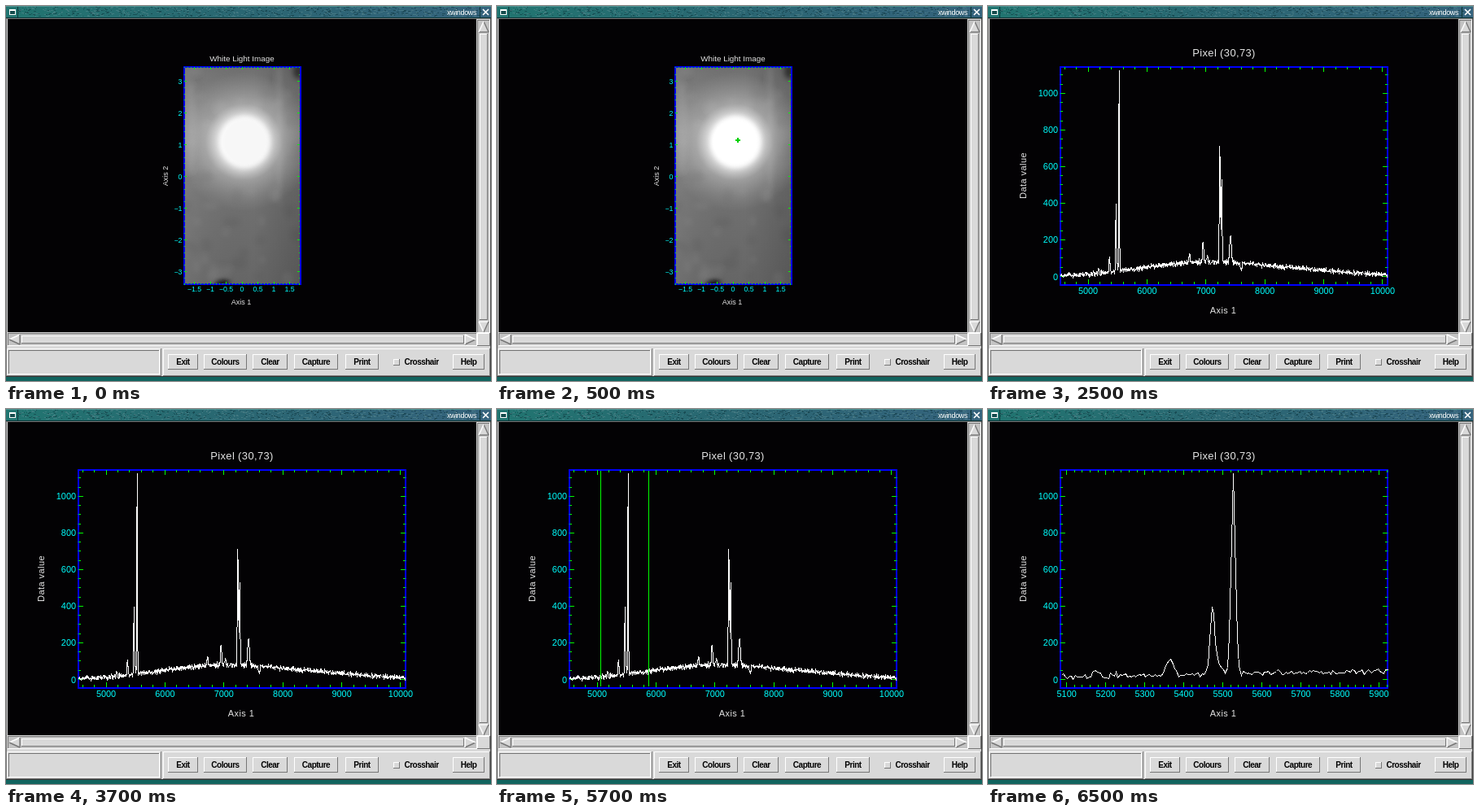
Write an HTML page that moves like this. It is 596 by 461 pixels and loops after 8000 ms.

```html
<!DOCTYPE html>
<html lang="en">
<head>
<meta charset="utf-8">
<title>Spectrum viewer</title>
<style>
html, body { margin: 0; width: 100%; height: 100%; overflow: hidden; background: #000; }
svg { display: block; width: 100%; height: 100%; font-family: "Liberation Sans", Arial, sans-serif; }
.ui { font-weight: bold; letter-spacing: -.5px; }
</style>
</head>
<body>
<svg id="stage" viewBox="0 0 596 461" preserveAspectRatio="none">
  <defs>
    <linearGradient id="bar">
      <stop offset="0" stop-color="#217570"/>
      <stop offset=".5" stop-color="#2a6672"/>
      <stop offset="1" stop-color="#35637d"/>
    </linearGradient>
    <linearGradient id="sky" x1="0" y1="0" x2="0" y2="1">
      <stop offset="0" stop-color="#707070"/>
      <stop offset=".3" stop-color="#898989"/>
      <stop offset=".58" stop-color="#717171"/>
      <stop offset="1" stop-color="#666"/>
    </linearGradient>
    <linearGradient id="side">
      <stop offset="0" stop-color="#fff" stop-opacity=".07"/>
      <stop offset=".6" stop-color="#000" stop-opacity="0"/>
      <stop offset="1" stop-color="#000" stop-opacity=".15"/>
    </linearGradient>
    <radialGradient id="glow">
      <stop offset=".3" stop-color="#fff"/>
      <stop offset=".4" stop-color="#eee" stop-opacity=".75"/>
      <stop offset=".55" stop-color="#ddd" stop-opacity=".38"/>
      <stop offset="1" stop-color="#bbb" stop-opacity="0"/>
    </radialGradient>
    <filter id="soft" x="-50%" y="-50%" width="200%" height="200%"><feGaussianBlur stdDeviation="3"/></filter>
    <clipPath id="frame"><rect x="219" y="75" width="142" height="267"/></clipPath>
  </defs>
  <g id="chrome"></g>
  <g id="image"></g>
  <g id="plot"></g>
  <g id="wide"></g>
  <g id="range"></g>
  <g id="zoom"></g>
</svg>
<script>
const LOOP = 8000;
const FACE = "#d9d9d9", LIGHT = "#fff", SHADE = "#777", TROUGH = "#c3c3c3";
const CYAN = "#0ff", GREEN = "#0f0", BLUE = "#00f", TEXT = "#e4e4e4";
const $ = id => document.getElementById(id);

function add(parent, tag, attrs, text) {
  const el = document.createElementNS("http://www.w3.org/2000/svg", tag);
  for (const k in attrs) el.setAttribute(k, attrs[k]);
  if (text !== undefined) el.textContent = text;
  parent.appendChild(el);
  return el;
}
const box = (g, x, y, width, height, fill) =>
  add(g, "rect", { x, y, width, height, fill, "shape-rendering": "crispEdges" });
const path = (g, d, stroke, width = 1, more = {}) =>
  add(g, "path", { d, stroke, "stroke-width": width, fill: "none", "shape-rendering": "crispEdges", ...more });
const label = (g, x, y, text, size, fill = TEXT, more = {}) =>
  add(g, "text", { x, y, fill, "font-size": size, "text-anchor": "middle", ...more }, text);
const sideLabel = (g, x, y, text, size, more) =>
  label(g, 0, 0, text, size, TEXT, { transform: `translate(${x} ${y}) rotate(-90)`, ...more });

function random(seed) {
  return () => (seed = (seed * 16807) % 2147483647) / 2147483647;
}

function bevel(g, x, y, w, h, sunken, fill = FACE) {
  box(g, x, y, w, h, sunken ? LIGHT : SHADE);
  box(g, x, y, w - 1, h - 1, sunken ? SHADE : LIGHT);
  box(g, x + 1, y + 1, w - 2, h - 2, fill);
}

// Triangle lit from the upper left
function arrow(g, cx, cy, turns) {
  const c = [1, 0, -1, 0][turns], s = [0, 1, 0, -1][turns];
  const pts = [[0, -7], [6, 6], [-6, 6]].map(([x, y]) => [x * c - y * s, x * s + y * c]);
  const at = ([x, y]) => `${cx + x} ${cy + y}`;
  add(g, "path", { d: `M${pts.map(at).join("L")}Z`, fill: FACE });
  pts.forEach((p, i) => {
    const q = pts[(i + 1) % 3];
    const lit = p[0] + q[0] + p[1] + q[1] < 0;
    path(g, `M${at(p)}L${at(q)}`, lit ? LIGHT : SHADE, 1.4, { "shape-rendering": "auto" });
  });
}

function drawTitleBar(g) {
  box(g, 0, 0, 596, 15, "url(#bar)");
  const rnd = random(71);
  for (const color of ["#0b3038", "#5a8a90"]) {
    let d = "";
    for (let i = 0; i < 450; i++) {
      d += `M${15 + Math.floor(rnd() * 568)} ${1.5 + Math.floor(rnd() * 12)}h${1 + Math.floor(rnd() * 3)}`;
    }
    path(g, d, color, 1, { opacity: .5 });
  }
  box(g, 0, 0, 596, 1, "#4f9492");
  box(g, 0, 14, 596, 1, "#0b3638");
  for (const x of [14, 582]) box(g, x, 1, 1, 13, "#0b3638");
  box(g, 4, 4, 8, 7, LIGHT);
  box(g, 5, 6, 6, 4, "#174d4e");
  path(g, "M586 4l7 7m0-7l-7 7", LIGHT, 1.6, { "shape-rendering": "auto" });
  label(g, 560, 11, "xwindows", 9, LIGHT, { "letter-spacing": "-.35px" });
}

function drawChrome() {
  const g = $("chrome");
  box(g, 0, 0, 596, 461, FACE);
  drawTitleBar(g);
  box(g, 0, 15, 596, 1, SHADE);
  box(g, 0, 15, 1, 440, SHADE);
  box(g, 2, 16, 576, 385, "#030204");

  bevel(g, 579, 17, 16, 385, true, TROUGH);
  arrow(g, 587, 26, 0);
  bevel(g, 582, 34, 10, 352, false);
  arrow(g, 587, 394, 2);

  bevel(g, 2, 402, 577, 16, true, TROUGH);
  arrow(g, 11, 410, 3);
  bevel(g, 19, 405, 544, 10, false);
  arrow(g, 570, 410, 1);
  bevel(g, 579, 402, 16, 16, false);

  bevel(g, 1, 421, 190, 34, false);
  bevel(g, 3, 423, 186, 30, true);
  bevel(g, 193, 421, 402, 34, false);

  const buttons = { Exit: [199, 37], Colours: [243, 53], Clear: [303, 43],
    Capture: [354, 54], Print: [417, 41], Help: [549, 39] };
  for (const [name, [x, w]] of Object.entries(buttons)) {
    bevel(g, x, 428, w, 19, false);
    label(g, x + w / 2, 440.5, name, 10, "#000", { class: "ui" });
  }
  bevel(g, 476, 434, 8, 8, false);
  label(g, 510.5, 440.5, "Crosshair", 10, "#000", { class: "ui" });

  box(g, 0, 455, 596, 1, "#333");
  box(g, 0, 456, 596, 5, "#12645f");
  box(g, 595, 15, 1, 441, "#444");
}

// Tick marks on both sides of the frame; every major-th one is long
function ticks(g, from, to, step, major, lengths, pos, near, far, vertical) {
  let d = "";
  for (let i = Math.ceil(from / step); i * step <= to; i++) {
    const p = Math.floor(pos(i * step)) + .5, n = lengths[i % major ? 0 : 1];
    d += vertical ? `M${near} ${p}h${n}M${far} ${p}h${-n}` : `M${p} ${near}v${-n}M${p} ${far}v${n}`;
  }
  path(g, d, GREEN);
}

function drawImage() {
  const g = $("image");
  const pic = add(g, "g", { "clip-path": "url(#frame)" });
  for (const fill of ["sky", "side"]) box(pic, 219, 75, 142, 267, `url(#${fill})`);
  const blur = add(pic, "g", { filter: "url(#soft)" });
  const blob = (cx, cy, rx, ry, fill, opacity) => add(blur, "ellipse", { cx, cy, rx, ry, fill, opacity });
  const rnd = random(29);
  for (let i = 0; i < 60; i++) {
    blob(219 + rnd() * 142, 80 + rnd() * 262, 4 + rnd() * 7, 3 + rnd() * 6, i % 2 ? "#fff" : "#222", .05);
  }
  blob(336, 150, 3, 95, "#fff", .13);
  blob(227, 150, 7, 55, "#fff", .1);
  blob(265, 340, 10, 4, "#000", .9);
  blob(359, 80, 6, 10, "#000", .5);
  add(pic, "circle", { cx: 292, cy: 167, r: 86, fill: "url(#glow)" });
  add(pic, "ellipse", { id: "core", cx: 294, cy: 167, rx: 30, ry: 31, filter: "url(#soft)" });

  path(g, "M219 75H361.5V342H219Z", BLUE, 2);
  const px = v => 290 + 39 * v, py = v => 209.5 - 39 * v;
  ticks(g, -1.8, 1.8, .1, 5, [1, 3], px, 342, 75, false);
  ticks(g, -3.4, 3.4, .2, 5, [1, 3], py, 219, 361, true);
  const signed = v => String(v).replace("-", "\u2212");
  for (let v = -1.5; v <= 1.5; v += .5) label(g, px(v), 351, signed(v), 8.8, CYAN);
  for (let v = -3; v <= 3; v++) label(g, 216.5, py(v) + 3, signed(v), 8.8, CYAN, { "text-anchor": "end" });
  label(g, 290, 68, "White Light Image", 9.9);
  label(g, 289, 366.5, "Axis 1", 9);
  sideLabel(g, 198.5, 209, "Axis 2", 9);
  path(g, "M293 165H299M296 162V168", "#00d000", 2, { id: "cross" });
}

const valueY = v => 332.5 - .2252 * v;

function drawPlot() {
  const g = $("plot"), spaced = { "letter-spacing": ".4px" };
  path(g, "M89 75H491V342.5H89Z", BLUE, 2);
  ticks(g, -40, 1140, 50, 4, [3, 6], valueY, 89, 491, true);
  for (let v = 0; v <= 1000; v += 200) {
    label(g, 86, valueY(v) + 4, v, 10.9, CYAN, { "text-anchor": "end" });
  }
  label(g, 290, 62, "Pixel (30,73)", 12.9, TEXT, spaced);
  label(g, 289, 378, "Axis 1", 11, TEXT, spaced);
  sideLabel(g, 47, 208.5, "Data value", 11.1, spaced);
}

// Emission lines: wavelength, height, width
const LINES = [
  [5174, 32, 7], [5365, 85, 8], [5474, 375, 6], [5492, 45, 9], [5527, 1085, 5.5],
  [6722, 50, 9], [6952, 105, 9], [7022, 35, 9],
  [7237, 640, 8], [7267, 450, 8], [7417, 150, 14], [7600, -35, 12]
];
const bell = (x, mid, width) => Math.exp(-(((x - mid) / width) ** 2) / 2);
const continuum = w => 78 * bell(w, 7000, w < 7000 ? 1080 : 1550);

function makeSpectrum() {
  const rnd = random(433), samples = [];
  for (let w = 4527; w < 10085; w += 5) {
    const noise = (rnd() + rnd() + rnd() - 1.5) * 14;
    const peaks = LINES.reduce((sum, [mid, height, width]) => sum + height * bell(w, mid, width), 0);
    samples.push([w, continuum(w) + peaks + noise]);
  }
  return samples;
}
const spectrum = makeSpectrum();

function drawSpectrum(g, from, to, step) {
  const pos = w => 89 + 402 * (w - from) / (to - from);
  ticks(g, from, to, step / 5, 5, [3, 6], pos, 342, 75, false);
  for (let w = Math.ceil(from / step) * step; w <= to; w += step) label(g, pos(w), 354, w, 10.9, CYAN);
  const snap = v => Math.floor(v) + .5;
  const points = spectrum.filter(([w]) => w >= from && w <= to)
    .map(([w, v]) => `${snap(pos(w))} ${snap(valueY(v))}`);
  path(g, "M" + points.join("L"), "#fff");
}

function show(id, on) { $(id).style.display = on ? "" : "none"; }

function render(t) {
  show("image", t < 2500);
  show("cross", t >= 500);
  show("plot", t >= 2500);
  show("wide", t >= 2500 && t < 6500);
  show("range", t >= 4500 && t < 6500);
  show("zoom", t >= 6500);
  $("core").setAttribute("fill", t < 500 ? "#f7f7f7" : "#fff");
}

drawChrome();
drawImage();
drawPlot();
drawSpectrum($("wide"), 4530, 10083, 1000);
path($("range"), "M127.5 76V341M186.5 76V341", GREEN);
drawSpectrum($("zoom"), 5084, 5922, 100);

const start = performance.now();
function tick() {
  render((performance.now() - start) % LOOP);
  requestAnimationFrame(tick);
}
tick();
</script>
</body>
</html>
```
